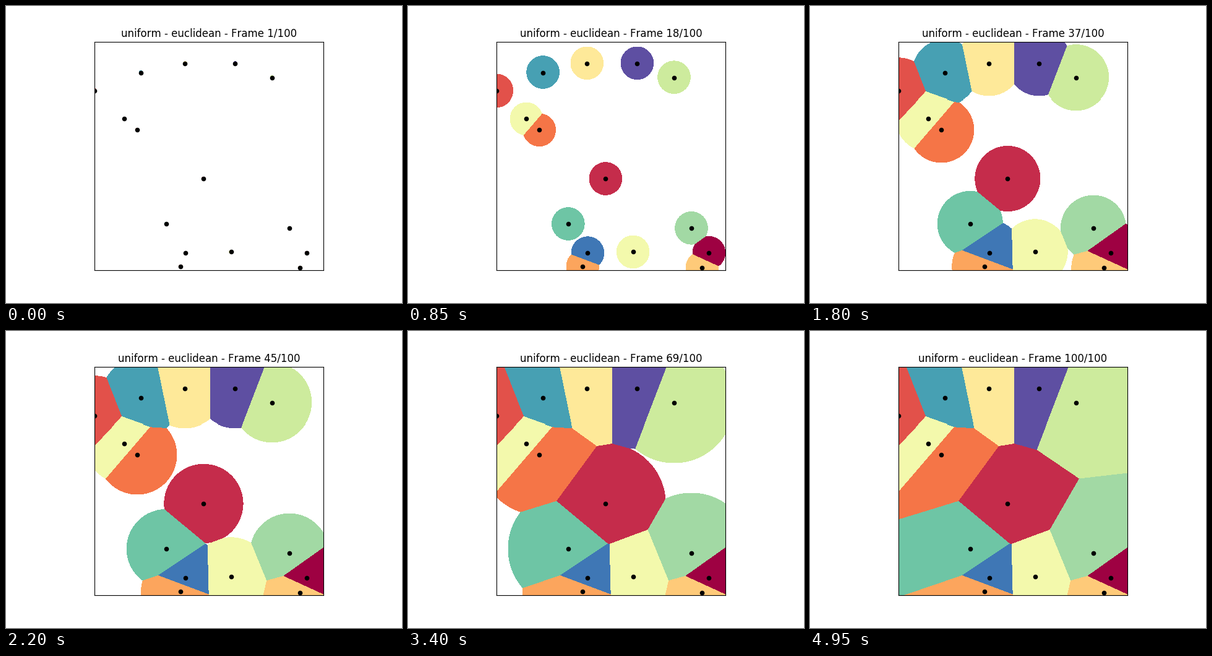
Write a matplotlib script that moves like this. It is 640 px wide and 480 px high and loops after 5000 ms.

```python
import matplotlib.pyplot as plt
import numpy as np
from matplotlib.animation import FuncAnimation

W, H, DPI = 640, 480, 100
FRAMES, INTERVAL = 100, 50
R_START = 3.3

# Plot box in stage pixels, y pointing down
LEFT, RIGHT, TOP, BOTTOM = 143.2, 512.8, 57.6, 427.2

# Seed points, in the order of their colours along the Spectral map
SITES = [
    (486.4, 398.8), (319.4, 279), (143.3, 137.4), (212.2, 200.3),
    (282.3, 420.8), (475.4, 422.8), (289.3, 93.3), (191.4, 182.4),
    (363.6, 397.4), (430, 116.2), (458, 358.8), (258.8, 352),
    (218.1, 108), (290.4, 399.2), (370.4, 93.3),
]

plt.rcParams["text.kerning_factor"] = 6

# One image cell per stage pixel
x0, x1 = int(LEFT), int(RIGHT) + 1
y0, y1 = int(TOP), int(BOTTOM) + 1
gx, gy = np.meshgrid(np.arange(x0, x1) + 0.5, np.arange(y0, y1) + 0.5)
dist = np.array([np.hypot(gx - x, gy - y) for x, y in SITES])
nearest = dist.min(axis=0)
r_end = nearest.max()

colours = plt.get_cmap("Spectral")(np.linspace(0, 1, len(SITES)))[:, :3]
colours = (colours * 255).round().astype(np.uint8)
colours[7:9] = 243, 249, 172  # the two middle steps share one pale yellow
cells = colours[dist.argmin(axis=0)]

fig = plt.figure(figsize=(W / DPI, H / DPI), dpi=DPI, facecolor="white")
ax = fig.add_axes([LEFT / W, 1 - BOTTOM / H,
                   (RIGHT - LEFT) / W, (BOTTOM - TOP) / H])
image = ax.imshow(np.full_like(cells, 255), interpolation="nearest",
                  extent=(x0, x1, y1, y0), aspect="auto")
ax.scatter(*zip(*SITES), s=20, c="black")
ax.set(xlim=(LEFT, RIGHT), ylim=(BOTTOM, TOP), xticks=[], yticks=[])
title = ax.set_title("", fontname="DejaVu Sans", fontsize=12)


def draw(i):
    radius = R_START + (r_end - R_START) * i / (FRAMES - 1)
    inside = (nearest <= radius)[..., None]
    image.set_data(np.where(inside, cells, np.uint8(255)))
    title.set_text(f"uniform - euclidean - Frame {i + 1}/{FRAMES}")
    return image, title


anim = FuncAnimation(fig, draw, frames=FRAMES, interval=INTERVAL,
                     repeat=True, repeat_delay=0)
plt.show()
```
